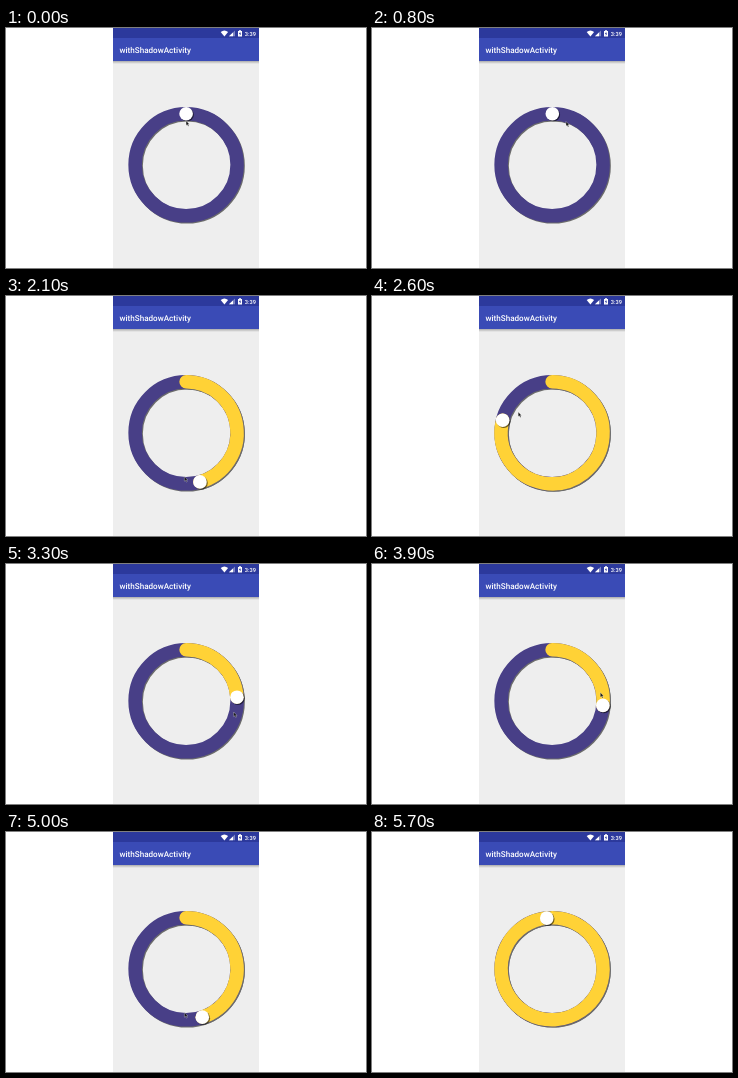
An HTML page for the animation above (5.9 s loop, 360 by 240 pixels).

```html
<!DOCTYPE html>
<html lang="en">
<head>
<meta charset="utf-8">
<title>Circular seek bar</title>
<style>
  html, body { margin: 0; width: 100%; height: 100%; overflow: hidden; background: #fff; }
  svg { display: block; width: 360px; height: 240px; }
  text { font: 500 8.1px Roboto, sans-serif; fill: #fff; text-rendering: geometricPrecision; }
  .clock { font-size: 5.7px; }
  .ring { fill: none; stroke-width: 13.5; }
  .shadow { filter: drop-shadow(1px 1px .4px rgba(0, 0, 0, .55)); }
</style>
</head>
<body>
<svg viewBox="0 0 360 240">
  <defs>
    <linearGradient id="fade" x2="0" y2="1">
      <stop stop-color="#000" stop-opacity=".28"/>
      <stop offset="1" stop-color="#000" stop-opacity="0"/>
    </linearGradient>
  </defs>
  <rect x="107" width="146" height="240" fill="#eee"/>
  <rect x="107" y="33" width="146" height="3" fill="url(#fade)"/>
  <rect x="107" y="10" width="146" height="23" fill="#3a4bb6"/>
  <rect x="107" width="146" height="10" fill="#2c399c"/>
  <g fill="#fff">
    <path d="M214.7 4Q218.4 1 222.1 4L218.4 8.5Z"/>
    <path d="M223 8.3L229 2.4V8.3Z" opacity=".4"/>
    <path d="M223 8.3L227 4.4V8.3Z"/>
    <path d="M232 3H233V2.3H235V3H236V8.5H232Z"/>
    <path d="M234.3 3.8L232.9 6.1H233.8V7.7L235.2 5.4H234.3Z" fill="#2c399c"/>
  </g>
  <text class="clock" x="238.7" y="8">3:39</text>
  <text x="113.5" y="25">withShadowActivity</text>

  <g transform="translate(180.1 136.8)">
    <g class="shadow">
      <circle class="ring" r="51" stroke="#483f87"/>
      <path class="ring" id="progress" stroke="#ffd236" stroke-linecap="round"/>
    </g>
    <circle class="shadow" id="knob" r="6.8" fill="#fff"/>
    <path id="cursor" d="M0 0V4.6L1.1 3.7L2 5.5L2.8 5.1L2 3.4H3.3Z" fill="#111" stroke="#fff" stroke-width=".3"/>
  </g>
</svg>
<script>
const LOOP = 5900, RADIUS = 51;
const LEAD = 75; // the knob trails the pointer by this many ms
// turning points of the drag: time, degrees clockwise from the top
const turns = [[0, 0], [800, 0], [1090, 68], [1400, -4], [2600, 284], [3600, 515], [4400, 356], [5700, 714], [LOOP, 714]];
const knob = document.getElementById("knob");
const progress = document.getElementById("progress");
const cursor = document.getElementById("cursor");

const sin = degrees => Math.sin(degrees * Math.PI / 180);
const polar = (angle, radius) => [sin(angle) * radius, -sin(angle + 90) * radius];

function angleAt(time) {
  const next = turns.findIndex(turn => turn[0] > time);
  if (next < 0) return turns.at(-1)[1];
  const [t0, a0] = turns[next - 1], [t1, a1] = turns[next];
  return a0 + (a1 - a0) * (time - t0) / (t1 - t0);
}

function arc(sweep) {
  if (sweep < .5) return "";
  return `M0 ${-RADIUS}A${RADIUS} ${RADIUS} 0 ${sweep > 180 ? 1 : 0} 1 ${polar(sweep, RADIUS)}`;
}

function draw() {
  const time = performance.now() % LOOP;
  const angle = angleAt(time);
  const pointAngle = angleAt(time + LEAD);
  const pointRadius = 44 + 5 * sin(pointAngle); // the hand circles a little to the right
  progress.setAttribute("d", arc((angle + 360) % 360));
  knob.setAttribute("transform", `translate(${polar(angle, RADIUS)})`);
  cursor.setAttribute("transform", `translate(${polar(pointAngle, pointRadius)})`);
  cursor.setAttribute("visibility", time < 5650 ? "visible" : "hidden");
  requestAnimationFrame(draw);
}
draw();
</script>
</body>
</html>
```
